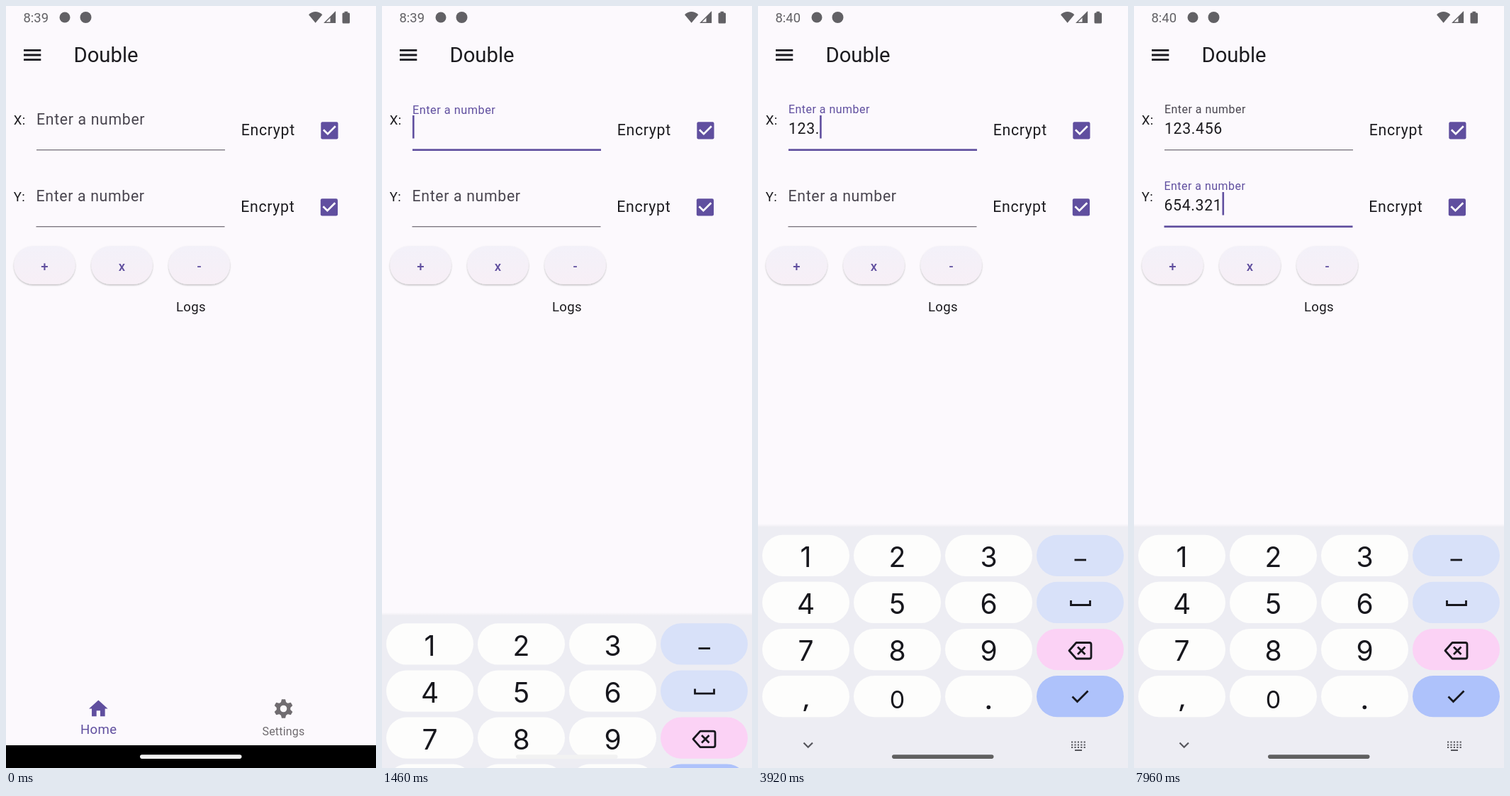
Recreate the animation shown at these times as an HTML page. Size 522 by 1073 pixels, loop 8 s.

```html
<!DOCTYPE html>
<html lang="en">
<head>
<meta charset="utf-8">
<title>Double</title>
<style>
  html, body { margin: 0; width: 100%; height: 100%; overflow: hidden; background: #fcf9fd; }
  svg { display: block; width: 100%; height: 100%; }
  text { font-family: Roboto, sans-serif; fill: #1c1b1f; white-space: pre; }
  .large { font-size: 21.27px; letter-spacing: .665px; }
  .medium { font-size: 18.6px; letter-spacing: .33px; }
  .op { font-size: 18.6px; font-weight: 500; fill: #604f9f; text-anchor: middle; }
  .digit { font-family: Inter, sans-serif; font-size: 39px; fill: #17171d; text-anchor: middle; }
  .line { fill: none; stroke: #17171d; stroke-width: 2.8; }
</style>
</head>
<body>
<svg id="stage" viewBox="0 0 522 1073">
  <defs>
    <linearGradient id="buttonFill" x2="0" y2="1">
      <stop offset="0" stop-color="#f3f1f9"/><stop offset="1" stop-color="#f7eff6"/>
    </linearGradient>
    <linearGradient id="edge" x2="0" y2="1">
      <stop offset="0" stop-color="#ededf2" stop-opacity="0"/><stop offset="1" stop-color="#e9e8ee"/>
    </linearGradient>
    <filter id="shadow" x="-10%" y="-10%" width="120%" height="130%">
      <feDropShadow dx="0" dy="1.3" stdDeviation="1" flood-color="#000" flood-opacity=".28"/>
    </filter>
  </defs>
  <rect width="522" height="1073" fill="#fcf9fd"/>

  <g fill="#626165">
    <text id="clock" x="24.5" y="23.2" font-size="18.4" style="fill:#626165">8:39</text>
    <circle cx="83" cy="16" r="7.5"/>
    <circle cx="112.5" cy="16" r="8"/>
    <path d="M427 12.2Q436.5 4 446.300 12.200L436.600 23.800Z"/>
    <path d="M449.800 23.300L464.400 8.700V23.300Z" fill="none" stroke="#626165" stroke-width="1.400"/>
    <path d="M457.500 15.500L465 8V24H457.500Z"/>
    <path d="M477.500 7.800h4.500v1.700h1.500q1.500 0 1.500 1.500v12q0 1.500-1.500 1.500h-7.500q-1.500 0-1.500-1.500v-12q0-1.500 1.500-1.500h1.500z"/>
  </g>
  <path d="M25 62.300H49.300M25 69H49.300M25 75.700H49.300" class="line" stroke-width="2.7"/>
  <text x="95.500" y="78.500" font-size="29.240">Double</text>

  <g id="form"></g>
  <text x="240" y="429.500" class="medium">Logs</text>

  <rect id="divider" y="962.500" width="522" height="1.500" fill="#efe9f1"/>
  <path transform="translate(114.400 973.600) scale(1.329)" d="M10 20v-6h4v6h5v-8h3L12 3 2 12h3v8z" fill="#604f9f"/>
  <text x="130.700" y="1025" class="medium" text-anchor="middle" style="fill:#604f9f">Home</text>
  <g id="gear" transform="translate(391.500 989.500) scale(1.329)" fill="#706c70">
    <circle r="5.500" fill="none" stroke="#706c70" stroke-width="3.800"/>
  </g>
  <text x="391.500" y="1026.500" font-size="16" letter-spacing=".2" text-anchor="middle" style="fill:#706c70">Settings</text>
  <rect y="1041" width="522" height="32"/>

  <g id="keyboard">
    <rect y="729" width="522" height="6" fill="url(#edge)"/>
    <rect y="734" width="522" height="342" fill="#ededf3"/>
    <g id="keys"></g>
    <g class="line">
      <path d="M446.500 780H463"/>
      <path d="M441.500 837V843.500H468.500V837"/>
      <path d="M449 896.500H467.500Q470 896.500 470 899V916.500Q470 919 467.500 919H449L439 907.700ZM451 902.500L461.500 913M461.500 902.500L451 913" stroke-linejoin="round"/>
      <path d="M443.500 972.500L450.500 979.500L465.500 964.500"/>
      <path d="M64.500 1037.500L70.700 1043.700L77 1037.500" stroke-width="2" style="stroke:#56565c;stroke-width:2.200"/>
      <path d="M442 1036.500H462M442 1040.500H462" style="stroke:#56565c;stroke-width:2.200" stroke-dasharray="2.200 2.200"/>
      <path d="M442 1044H462" style="stroke:#56565c;stroke-width:1.800" stroke-dasharray="2.200 2.200"/>
      <path d="M447 1048H457" style="stroke:#56565c;stroke-width:2"/>
    </g>
    <path d="M66.500 983.500h4.300l-3.600 9.500h-3z" fill="#17171d"/>
    <circle cx="325.300" cy="987.500" r="2.800" fill="#17171d"/>
  </g>
  <rect id="handle" x="189" y="1054.300" width="143.500" height="5.600" rx="2.800"/>
</svg>
<script>
const LOOP = 8000;
const ACCENT = '#604f9f';
const KEYBOARD_TRAVEL = 340;
const $ = id => document.getElementById(id);

function add(parent, tag, attrs, text = '') {
  const node = document.createElementNS('http://www.w3.org/2000/svg', tag);
  set(node, attrs);
  node.textContent = text;
  return parent.appendChild(node);
}
function set(node, attrs) {
  for (const name in attrs) node.setAttribute(name, attrs[name]);
}
const clamp = v => Math.max(0, Math.min(1, v));
const progress = (t, start, length) => clamp((t - start) / length);
const mix = (a, b, p) => a + (b - a) * p;
const easeOut = p => 1 - (1 - p) ** 3;
const easeInOut = p => p * p * (3 - 2 * p);

function ramp(t, stops) {
  let value = stops[0][1];
  for (let i = 1; i < stops.length; i++) {
    const [from, a] = stops[i - 1], [to, b] = stops[i];
    if (t >= from) value = mix(a, b, progress(t, from, to - from));
  }
  return value;
}

function makeField({ name, x, dy, value, focus, blur, typed }) {
  const g = add($('form'), 'g', { transform: `translate(0 ${dy})` });
  add(g, 'text', { x: 10.7, y: 167, class: 'medium' }, name + ':');
  add(g, 'text', { x: x + 288.800, y: 182.300, class: 'large' }, 'Encrypt');
  const box = add(g, 'g', { transform: `translate(${x + 401.300} 163.300)` });
  add(box, 'rect', { width: 24.200, height: 24.200, rx: 2.200, fill: ACCENT });
  add(box, 'path', { d: 'M3.600 10.900L9.600 16.900L20.500 6', class: 'line', style: 'stroke:#fff;stroke-width:2.660' });
  return {
    focus, blur, typed, value, x,
    label: add(g, 'text', { class: 'large' }, 'Enter a number'),
    input: add(g, 'text', { x, y: 180, class: 'large' }),
    rule: add(g, 'rect', { x, width: 266 }),
    caret: add(g, 'rect', { y: 154, width: 2.600, height: 32.500, fill: ACCENT })
  };
}

const fields = [
  makeField({ name: 'X', x: 43, dy: 0, value: '123.456', focus: 1320, blur: 5350,
    typed: [2250, 2650, 3150, 3700, 4150, 4500, 4850] }),
  makeField({ name: 'Y', x: 42.500, dy: 108, value: '654.321', focus: 5350, blur: LOOP,
    typed: [6050, 6450, 6750, 7050, 7300, 7550, 7800] })
];

['+', 'x', '-'].forEach((sign, i) => {
  const x = 11.300 + i * 109.100;
  add($('form'), 'rect', { x, y: 338.300, width: 86.300, height: 53.500, rx: 26.700, fill: 'url(#buttonFill)', filter: 'url(#shadow)' });
  add($('form'), 'text', { x: x + 43.100, y: 372.500, class: 'op' }, sign);
});

for (let a = 0; a < 360; a += 60)
  add($('gear'), 'path', { d: 'M-2.900-6.300L-1.900-10H1.900L2.900-6.300Z', transform: `rotate(${a})` });

const sideFills = ['#d8e1f9', '#d8e1f9', '#fbd2f5', '#aec2fb'];
['123', '456', '789', ' 0 '].forEach((row, r) => {
  const y = 744.700 + r * 66.100;
  for (let c = 0; c < 4; c++) {
    const x = 6 + c * 129;
    add($('keys'), 'rect', { x, y, width: 123, height: 58.300, rx: 29.100, fill: c < 3 ? '#fdfdfc' : sideFills[r] });
    if (c < 3 && row[c] !== ' ') {
      const zero = row[c] === '0';
      add($('keys'), 'text', { x: x + 61.500, y: y + 45.500, class: 'digit', style: zero ? 'font-size:34px' : '' }, row[c]);
    }
  }
});

function drawField(f, t) {
  const focused = t >= f.focus && t < f.blur;
  const lift = easeInOut(progress(t, f.focus, 167));
  const past = f.typed.filter(time => time <= t);
  set(f.label, {
    transform: `translate(${f.x} ${mix(166.800, 150.500, lift)}) scale(${mix(1, .75, lift)})`,
    style: `fill:${focused ? ACCENT : '#49454f'}`
  });
  f.input.textContent = f.value.slice(0, past.length);
  set(f.rule, focused
    ? { y: 201.300, height: 2.660, fill: ACCENT }
    : { y: 202, height: 1.330, fill: '#7a757e' });
  const sinceInput = t - (past.length ? past[past.length - 1] : f.focus);
  set(f.caret, {
    x: f.x + f.input.getComputedTextLength(),
    visibility: focused && sinceInput % 1000 < 500 ? 'visible' : 'hidden'
  });
}

function draw(t) {
  fields.forEach(f => drawField(f, t));
  $('clock').textContent = t < 2000 ? '8:39' : '8:40';
  set($('divider'), { opacity: progress(t, 0, 400) });
  const rise = easeOut(progress(t, 1370, 320));
  set($('keyboard'), {
    transform: `translate(0 ${KEYBOARD_TRAVEL * (1 - rise)})`,
    visibility: rise ? 'visible' : 'hidden'
  });
  const grey = Math.round(ramp(t, [[1590, 242], [1640, 214], [1800, 119], [2830, 117], [3400, 96]]));
  set($('handle'), { fill: `rgb(${grey},${grey},${grey})` });
}

const start = performance.now();
function tick() {
  draw((performance.now() - start) % LOOP);
  requestAnimationFrame(tick);
}
tick();
</script>
</body>
</html>
```
